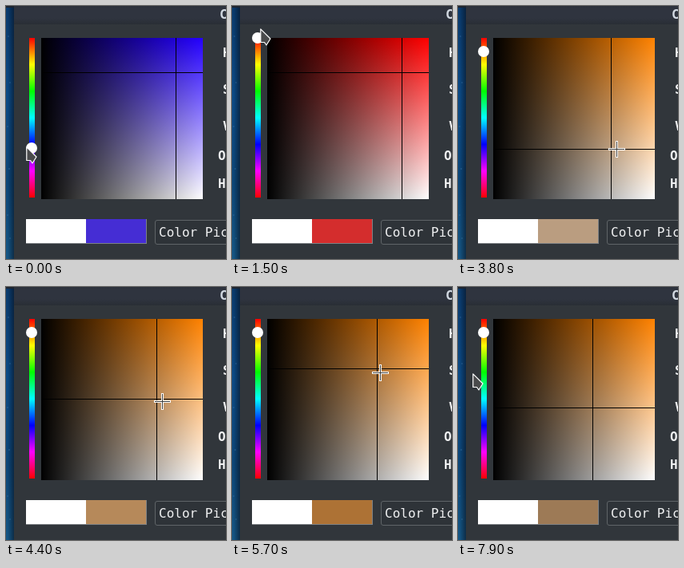
An HTML page for the animation above (8 s loop, 275x317 px).

```html
<!DOCTYPE html>
<html lang="en">
<head>
<meta charset="utf-8">
<title>Color picker</title>
<style>
  html, body { margin: 0; width: 100%; height: 100%; overflow: hidden; background: #31363b; }
  #stage { position: relative; width: 275px; height: 317px; overflow: hidden; background: #31363b; }
  #stage > * { position: absolute; }
  .desk {
    left: 0; top: 0; width: 10px; height: 317px;
    background:
      linear-gradient(#1d2530 0 2px, transparent 2px),
      linear-gradient(to right, transparent 20%, rgba(8, 18, 32, .6)),
      linear-gradient(#0a3a6c, #0b4a86 35%, #0c4678 70%, #155684);
  }
  .title {
    left: 10px; top: 0; width: 265px; height: 23px;
    background: linear-gradient(#2b303a, #2f343f 3px, #2f343f 15px, #292e35);
  }
  .hue {
    left: 29px; top: 40px; width: 7px; height: 200px;
    background: linear-gradient(#f00, #ff0, #0f0, #0ff, #00f, #f0f, #f00);
  }
  #field { left: 44px; top: 40px; width: 202px; height: 202px; }
  .line { background: #000; }
  #lineX { left: 0; top: 40px; width: 1px; height: 202px; }
  #lineY { left: 44px; top: 0; width: 202px; height: 1px; }
  #knob { left: 25px; top: -7px; width: 14px; height: 14px; border-radius: 50%; background: #fff; }
  .swatch { left: 25px; top: 267px; width: 151px; height: 31px; background: #7d8185; }
  .old { left: 25px; top: 267px; width: 75px; height: 30px; background: #fff; }
  #fresh { left: 100px; top: 267px; width: 75px; height: 30px; }
  .input {
    left: 186px; top: 268px; width: 120px; height: 29px;
    border: 1px solid #5f6468; border-radius: 3px; background: #2e3338;
  }
  svg { left: 0; top: 0; }
  text { font: 16px "DejaVu Sans Mono", monospace; fill: #eff0f1; }
  .bold text { font-weight: bold; }
</style>
</head>
<body>
<div id="stage">
  <div class="desk"></div>
  <div class="title"></div>
  <div class="hue"></div>
  <div id="field"></div>
  <div id="lineX" class="line"></div>
  <div id="lineY" class="line"></div>
  <div id="knob"></div>
  <div class="swatch"></div>
  <div class="old"></div>
  <div id="fresh"></div>
  <div class="input"></div>
  <svg width="275" height="317">
    <g fill="#4a83b5" opacity=".6">
      <circle cx="3" cy="38" r=".7"/><circle cx="5" cy="96" r=".7"/>
      <circle cx="2" cy="151" r=".7"/><circle cx="4" cy="204" r=".8"/>
      <circle cx="2" cy="262" r=".7"/><circle cx="5" cy="291" r=".7"/>
    </g>
    <g class="bold">
      <text x="267" y="16" style="fill:#d3dae3">C</text>
      <text x="271" y="64">H</text>
      <text x="271" y="110">S</text>
      <text x="271" y="156">V</text>
      <text x="265" y="193">O</text>
      <text x="265" y="228">H</text>
    </g>
    <text x="191" y="289">Color Picker</text>
    <path id="arrow" d="M.8 .8 L13 13 L8 21 L5.5 17.5 H.8 Z" fill="#4a4b4c" stroke="#fff" stroke-width="1.2" stroke-linejoin="round"/>
    <g id="cross" fill="none">
      <path d="M-10.5 0 H10.5 M0 -10.5 V10.5" stroke="#fff" stroke-width="3"/>
      <path d="M-9.5 0 H9.5 M0 -9.5 V9.5" stroke="#42403c" stroke-width="1"/>
    </g>
  </svg>
</div>
<script>
  const LOOP = 8000, STEP = 100;
  const $ = id => document.getElementById(id);
  const field = $('field'), fresh = $('fresh'), knob = $('knob');
  const lineX = $('lineX'), lineY = $('lineY'), arrow = $('arrow'), cross = $('cross');

  // Keys are [time, x, y]
  const pointer = [
    [0, 25, 176], [100, 25, 185], [700, 25, 185], [1500, 35, 28], [1700, 35, 28],
    [2100, 31, 56], [2300, 31, 56], [2600, 171, 71], [7200, 170, 154], [7900, 18, 108]
  ];
  const drag = [
    [3000, 172, 74], [3400, 170, 130], [3800, 191, 179], [4300, 200, 150], [4700, 135, 112],
    [5000, 131, 133], [5600, 172, 115], [6100, 216, 43], [6400, 234, 87], [7000, 168, 151]
  ];
  const lead = [[3000, 2, 3], [3800, 7, 0], [5000, 7, 5], [6400, 0, 4], [7000, 2, 3]];

  const smooth = (a, b, c, d, u) => b + (c - b) * u * u * (3 - 2 * u);
  const linear = (a, b, c, d, u) => b + (c - b) * u;
  const spline = (a, b, c, d, u) =>
    b + u / 2 * (c - a + u * (2 * a - 5 * b + 4 * c - d + u * (3 * (b - c) + d - a)));

  function at(keys, t, mix) {
    const last = keys.length - 1;
    if (t <= keys[0][0]) return keys[0].slice(1);
    if (t >= keys[last][0]) return keys[last].slice(1);
    const i = keys.findIndex(k => k[0] > t) - 1;
    const a = keys[Math.max(i - 1, 0)], b = keys[i], c = keys[i + 1], d = keys[Math.min(i + 2, last)];
    const u = (t - b[0]) / (c[0] - b[0]);
    return [1, 2].map(n => Math.round(mix(a[n], b[n], c[n], d[n], u)));
  }

  function hsv(h, s, v) {
    const part = n => {
      const k = (n + h / 60) % 6;
      return Math.round(255 * v * (1 - s * Math.max(0, Math.min(k, 4 - k, 1))));
    };
    return `rgb(${part(5)},${part(3)},${part(1)})`;
  }

  function draw(t) {
    const [px, py] = at(pointer, t, smooth);
    const dragging = t >= 3000 && t < 7300;
    const [x, y] = t < 3000 ? [212, 83] : at(drag, t, spline);
    const [dx, dy] = at(lead, t, linear);
    const hueY = t < 800 ? 178 : t < 2400 ? Math.max(40, py + 1) : 57;
    const hue = (hueY - 40) / 200 * 360;

    field.style.background =
      `linear-gradient(to right, #000, transparent), linear-gradient(${hsv(hue, 1, 1)}, #fff)`;
    fresh.style.background = hsv(hue, 1 - (y - 40) / 202, (x - 44) / 202);
    knob.style.transform = `translateY(${hueY}px)`;
    lineX.style.transform = `translateX(${x}px)`;
    lineY.style.transform = `translateY(${y}px)`;
    arrow.style.display = dragging ? 'none' : '';
    cross.style.display = dragging ? '' : 'none';
    arrow.setAttribute('transform', `translate(${px},${py})`);
    cross.setAttribute('transform', `translate(${x + dx + .5},${y + dy + .5})`);
  }

  const start = performance.now();
  function tick() {
    const t = (performance.now() - start) % LOOP;
    draw(Math.floor(t / STEP) * STEP);
    requestAnimationFrame(tick);
  }
  tick();
</script>
</body>
</html>
```
